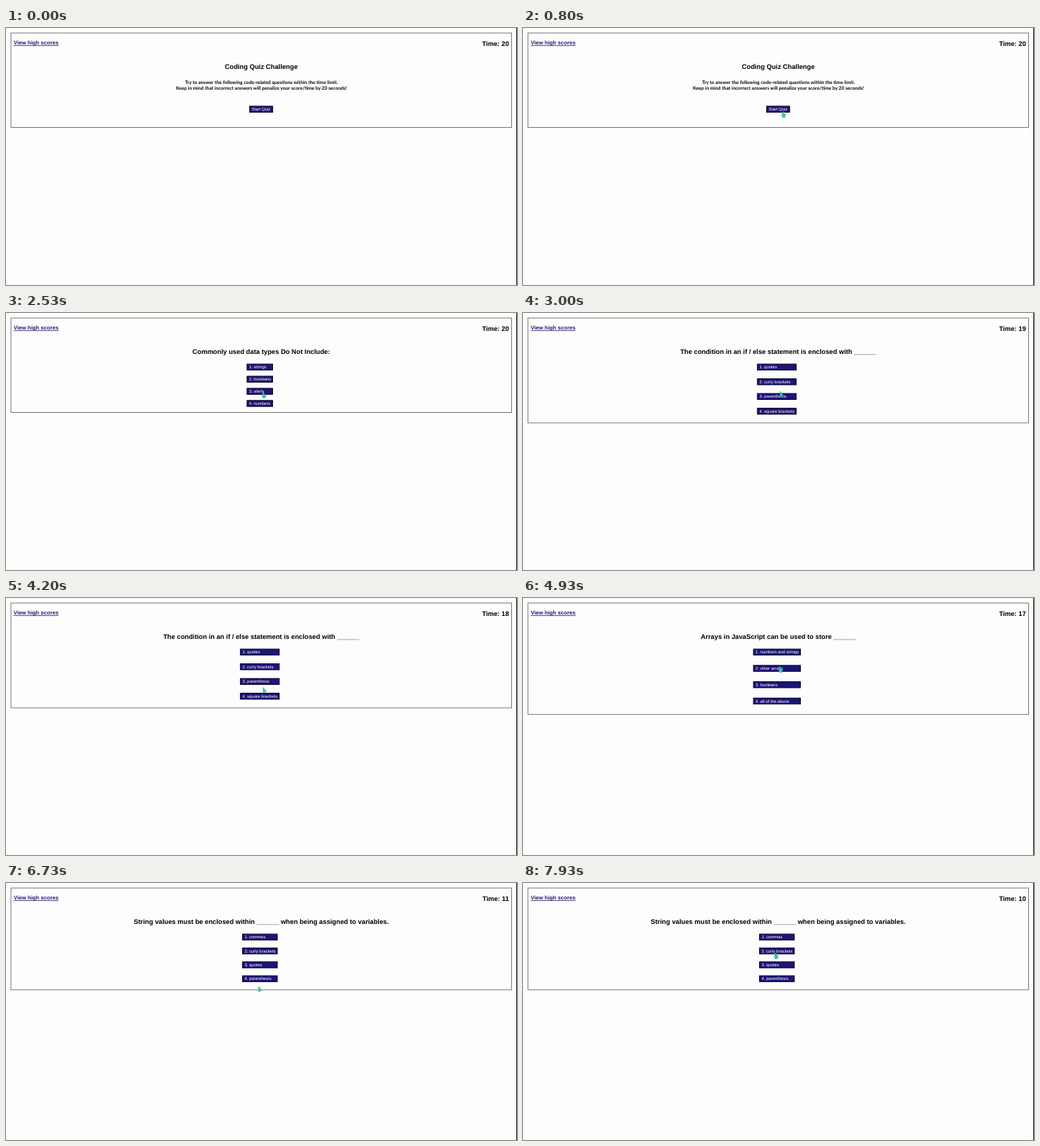
An HTML page for the animation above (8 s loop, 710 px wide and 358 px high).

```html
<!DOCTYPE html>
<html lang="en">
<head>
<meta charset="utf-8">
<style>
  html, body { margin: 0; height: 100%; overflow: hidden; background: #fdfdfe; }
  svg { display: block; width: 710px; height: 358px; text-rendering: geometricPrecision; }
  text { font-family: "Liberation Sans", Arial, sans-serif; white-space: pre; }
  .title, #time { font-size: 9.25px; font-weight: bold; }
  .note { font: bold 6.65px Lato, sans-serif; }
  .title, .note { text-anchor: middle; }
  .button rect { fill: #1d1478; stroke: #08051f; }
  .button text { font-size: 5.93px; fill: #fff; }
  #link { font-size: 7.65px; font-weight: bold; fill: #2a1a70; }
  #time { text-anchor: end; }
  #cursor path { fill: #2fd3b4; stroke: #2a8a86; stroke-width: .5; }
</style>
</head>
<body>
<svg viewBox="0 0 710 358">
  <rect x="709" width="1" height="358" fill="#111"/>
  <rect id="frame" x="6.9" y="7" width="695.6" fill="none" stroke="#777"/>
  <text id="link" x="10.7" y="23">View high scores</text>
  <path d="M10.7 24.5H73" stroke="#2a1a70" stroke-width=".8"/>
  <text id="time" x="698.8" y="25"></text>
  <g id="page"></g>
  <g id="cursor">
    <path id="arrow" d="M0 0V8L1.8 6.4 4.6 5.6Z"/>
    <path id="hand" d="M-1 .5Q0 -.5 .8 .5V3L3.3 3.6V6L2.5 8H-.6L-2 5 -1 4.8Z"/>
  </g>
</svg>
<script>
const LOOP = 8000;
const $ = id => document.getElementById(id);

const pages = [
  { at: 0, bottom: 138.5, title: "Coding Quiz Challenge", x: 338.4, w: 32.2, y: 108.9, step: 0,
    notes: ["Try to answer the following code-related questions within the time limit.",
            "Keep in mind that incorrect answers will penalize your score/time by 20 seconds!"],
    answers: ["Start Quiz"] },
  { at: 1600, bottom: 138.5, title: "Commonly used data types Do Not Include:", x: 334.9, w: 35.6, step: 16.9,
    answers: ["1. strings", "2. booleans", "3. alerts", "4. numbers"] },
  { at: 2730, bottom: 153, title: "The condition in an if / else statement is enclosed with ______", x: 325.7, w: 54, step: 20.5,
    answers: ["1. quotes", "2. curly brackets", "3. parenthesis", "4. square brackets"] },
  { at: 4730, bottom: 162.2, title: "Arrays in JavaScript can be used to store ______", x: 320.2, w: 65.3, step: 22.75,
    answers: ["1. numbers and strings", "2. other arrays", "3. booleans", "4. all of the above"] },
  { at: 6660, bottom: 148.8, title: "String values must be enclosed within ______ when being assigned to variables.", x: 328.6, w: 48.4, step: 19.35,
    answers: ["1. commas", "2. curly brackets", "3. quotes", "4. parenthesis"] }
];

// [time, seconds left]
const clock = [[0, 20], [2600, 19], [3600, 18], [4600, 17], [5600, 12], [6600, 11], [7600, 10]];

// [time, x, y] of the pointer's hot spot
const path = [
  [60, 378, 145], [860, 361, 116], [1260, 360, 113], [1860, 360, 113],
  [2260, 358, 111], [2400, 358, 111], [2700, 357, 109], [3600, 357, 109],
  [4050, 357, 131], [4400, 358, 115], [4660, 358, 115], [4930, 357, 95.5],
  [5130, 357, 95.5], [5930, 352, 128], [6260, 351, 133], [6460, 351, 144],
  [6730, 351, 144], [7400, 351, 112], [7930, 351, 97.5]
];

const latest = (list, t, key) => list.filter(item => item[key] <= t).pop();

function pointer(t) {
  const i = path.findIndex(p => p[0] > t);
  if (i < 0) return path[path.length - 1].slice(1);
  const [t0, x0, y0] = path[i - 1], [t1, x1, y1] = path[i];
  const u = (t - t0) / (t1 - t0), k = u * u * (3 - 2 * u);
  return [x0 + (x1 - x0) * k, y0 + (y1 - y0) * k];
}

const top_ = (page, i) => (page.y || 71.1) + i * page.step;

function button(page, label, i) {
  const y = top_(page, i);
  return `<g class="button"><rect x="${page.x}" y="${y}" width="${page.w}" height="8.4"/>
    <text x="${page.x + 2.8}" y="${y + 6.2}">${label}</text></g>`;
}

function show(page) {
  $("frame").setAttribute("height", page.bottom - 7);
  $("page").innerHTML = `<text class="title" x="354.7" y="57.3">${page.title}</text>`
    + (page.notes || []).map((s, i) => `<text class="note" x="354.8" y="${77.5 + i * 8.5}">${s}</text>`).join("")
    + page.answers.map((s, i) => button(page, s, i)).join("");
}

let shown;
function draw(now) {
  const t = now % LOOP, page = latest(pages, t, "at");
  if (page !== shown) show(shown = page);
  $("time").textContent = "Time: " + latest(clock, t, 0)[1];

  const visible = t >= path[0][0];
  $("cursor").style.display = visible ? "" : "none";
  if (visible) {
    const [x, y] = pointer(t);
    const over = x > page.x && x < page.x + page.w
      && page.answers.some((_, i) => y > top_(page, i) - .5 && y < top_(page, i) + 9);
    $("cursor").setAttribute("transform", `translate(${x} ${y})`);
    $("hand").style.display = over ? "" : "none";
    $("arrow").style.display = over ? "none" : "";
  }
  requestAnimationFrame(draw);
}
requestAnimationFrame(draw);
</script>
</body>
</html>
```
